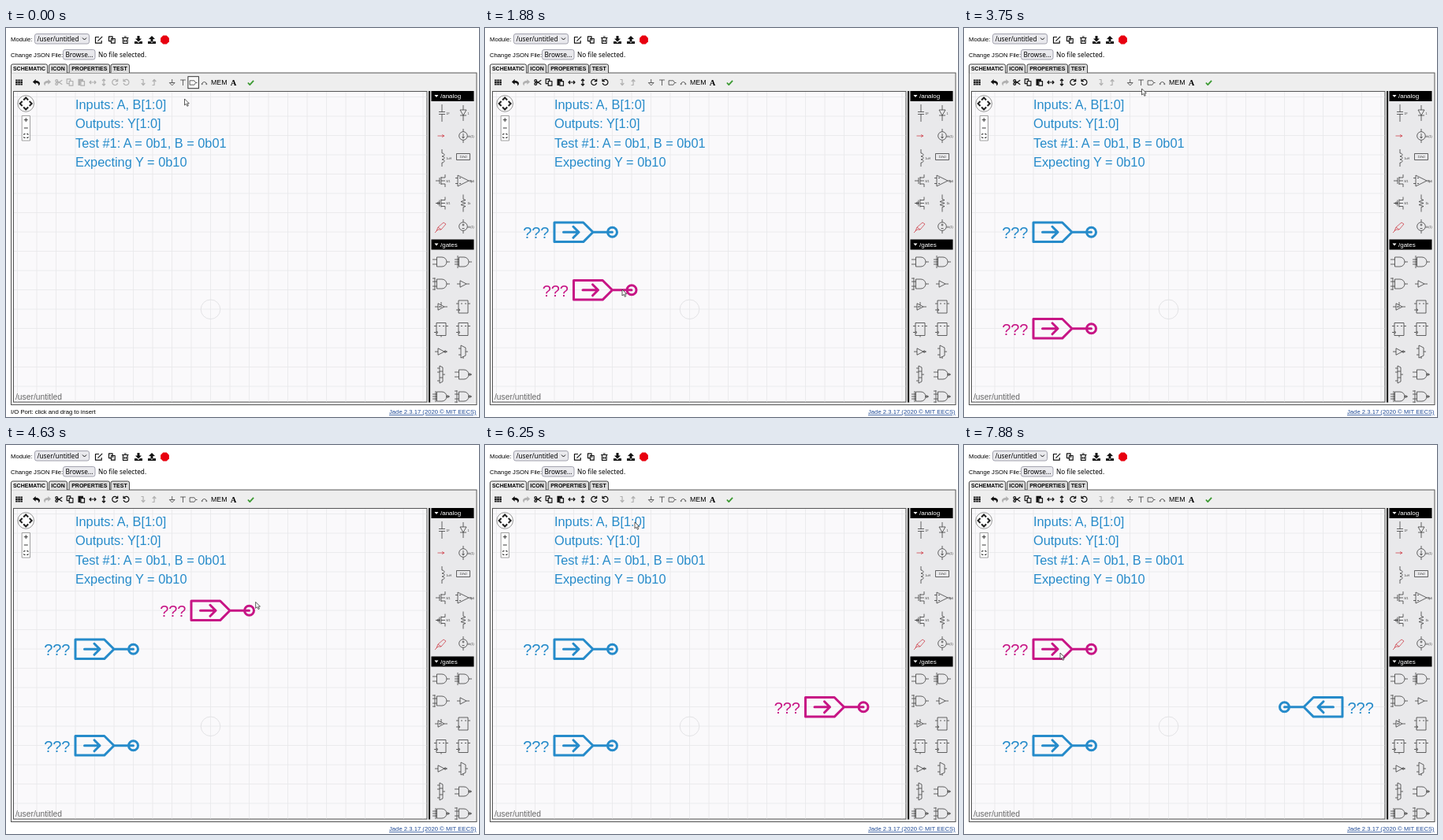
Recreate the animation shown at these times as an HTML page. Size 600 by 494 pixels, loop 8000 ms.

```html
<!DOCTYPE html>
<html lang="en">
<head>
<meta charset="utf-8">
<title>Schematic editor</title>
<style>
html, body { margin: 0; width: 100%; height: 100%; overflow: hidden; background: #fff; }
svg { display: block; width: 600px; height: 494px; font: 7.7px "Liberation Sans", Arial, sans-serif; }
.ui { font: 8.2px "Noto Sans", "Open Sans", sans-serif; }
.tab { font-weight: bold; font-size: 7px; }
.line { fill: none; stroke: #111; stroke-width: 1.2; stroke-linejoin: round; }
.thin { fill: none; stroke: #333; stroke-width: .75; }
.red { fill: none; stroke: #d0454f; stroke-width: .8; }
.fill { fill: #111; }
.off { opacity: .28; }
.note { font-size: 16.33px; fill: #268bca; }
.tiny { font-size: 3.6px; fill: #333; }
.port { fill: none; stroke-width: 3; stroke-linejoin: round; stroke-linecap: round; }
.label { font-size: 20px; }
</style>
</head>
<body>
<svg id="stage" viewBox="0 0 600 494">
  <text x="6" y="17">Module:</text>
  <rect x="36.5" y="7.5" width="69" height="12.5" rx="2.5" fill="#e9e9ed" stroke="#8f8f9d" stroke-width=".8"/>
  <text class="ui" x="39.5" y="16.7">/user/untitled</text>
  <path class="line" d="M97 12.5l2.5 2.5l2.5-2.5" style="stroke-width:1"/>
  <text x="6" y="36.6">Change JSON File:</text>
  <rect x="72.5" y="27.5" width="40.5" height="12.5" rx="2.5" fill="#e9e9ed" stroke="#8f8f9d" stroke-width=".8"/>
  <text class="ui" x="75.5" y="36.7">Browse...</text>
  <text class="ui" x="117" y="36.7">No file selected.</text>

  <rect x="6.5" y="57" width="590.5" height="421.5" fill="#eee" stroke="#555"/>
  <g id="tabs"></g>
  <rect x="9.5" y="80.5" width="524.5" height="394.5" fill="#faf9fb" stroke="#555"/>
  <path id="grid" fill="none" stroke="#e8e8ea" stroke-width=".8"/>
  <circle cx="259.5" cy="357.3" r="12.3" fill="none" stroke="#dedee0" stroke-width=".8"/>
  <g id="notes"></g>
  <text x="12" y="471.5" font-size="10.3" fill="#666">/user/untitled</text>

  <circle cx="25.2" cy="96" r="10.3" fill="#fff" stroke="#888" stroke-width=".9"/>
  <path fill="none" stroke="#222" stroke-width="2" d="M22.2 91.5l3-3l3 3M22.2 100.5l3 3l3-3M20.7 93l-3 3l3 3M29.7 93l3 3l-3 3"/>
  <path fill="#fff" stroke="#888" stroke-width=".8" d="M20.2 111.5h10.3v31.5h-10.3z"/>
  <path fill="none" stroke="#222" stroke-width=".9" d="M22.8 116.7h5M25.3 114.2v5M22.8 127h5M22.8 136v-1.5h1.7M26.3 134.5h1.7v1.5M28 138v1.5h-1.7M24.5 139.5h-1.7v-1.5"/>

  <rect x="536" y="80" width="2.2" height="395.5" fill="#222"/>
  <rect x="538.8" y="80" width="55.2" height="395.5" fill="#e9e9eb"/>
  <g id="headers"></g>
  <rect id="hover" y="61.7" width="13.5" height="15" fill="#fafafa" stroke="#222" stroke-width=".9"/>
  <g id="icons"></g>
  <g id="ports"></g>
  <text id="status" x="6" y="490"></text>
  <text x="486" y="490" fill="#1f4a96" text-decoration="underline">Jade 2.3.17 (2020 © MIT EECS)</text>
  <path id="arrow" fill="#fff" stroke="#333" stroke-width=".8" d="M0 0V8L2 6.3L3.4 9.3L4.8 8.6L3.4 5.8H5.8Z"/>
  <path id="hand" fill="#fff" stroke="#222" stroke-width=".8" d="M-.8 5V.6Q0-.6.8.6V3.8L4 4.6Q5 5 4.8 6.5L4 10H-.8L-3.4 6.4Q-3-5.6-.8 6.6Z"/>
</svg>
<script>
const $ = id => document.getElementById(id);
const LOOP = 8000, STEP = 125, GRID = 24.5, OX = 259.5, OY = 357;
const BLUE = '#268bca', PINK = '#c71585';

const icon = (x, y, d, cls = 'line', flip = '') =>
  `<path class="${cls}" transform="translate(${x} ${y}) ${flip}" d="${d}"/>`;
const text = (x, y, s, attrs = '') => `<text x="${x}" y="${y}" ${attrs}>${s}</text>`;
const ring = (x, y, r) => `M${x - r} ${y}a${r} ${r} 0 1 0 ${2 * r} 0a${r} ${r} 0 1 0 ${-2 * r} 0`;

// Tabs, notes, grid and part headers
$('tabs').innerHTML = [['SCHEMATIC', 6.5, 46], ['ICON', 54.5, 23], ['PROPERTIES', 80, 51.5], ['TEST', 133, 23.5]]
  .map(([name, x, w], i) =>
    `<path d="M${x} 57V48q0-2 2-2h${w - 4}q2 0 2 2v9" fill="${i ? '#ddd' : '#eee'}" stroke="#333" stroke-width=".9"/>` +
    text(x + w / 2, 54, name, 'class="tab" text-anchor="middle"')).join('') +
  '<path d="M7 57h45" stroke="#eee" stroke-width="1.4"/>';

$('notes').innerHTML = ['Inputs: A, B[1:0]', 'Outputs: Y[1:0]', 'Test #1: A = 0b1, B = 0b01', 'Expecting Y = 0b10']
  .map((s, i) => text(88, 102.7 + GRID * i, s, 'class="note"')).join('');

let lines = '';
for (let x = OX - 10 * GRID; x < 534; x += GRID) lines += `M${x} 81V474.5`;
for (let y = OY - 11 * GRID; y < 475; y += GRID) lines += `M10 ${y}H533.5`;
$('grid').setAttribute('d', lines);

$('headers').innerHTML = [['/analog', 80], ['/gates', 268.5]].map(([name, y]) =>
  `<rect x="539.5" y="${y}" width="54" height="13" fill="#000"/>` +
  `<path d="M543.5 ${y + 5}h5l-2.5 3z" fill="#fff"/>` +
  text(551, y + 9.4, name, 'fill="#fff" font-size="8"')).join('');

// File bar and toolbar
const COPY = 'M-1-1.5H3.7V4.2H-1ZM-1 1.6H-4V-4.2H.6V-1.5';
const UNDO = 'M-4.6-.6L-.8-4V-2C3-2 4.5 0 4.5 1.5C4.5 3 3.5 4 2.5 4.3C3.5 2 2 .7-.8.7V2.7Z';
const TURN = 'M2.8-2.2A3.5 3.5 0 1 0 3.4 1M3.5-4.3V-1.3H.5';
const LEVEL = 'M-3-3.5H-.4V3M-2.6 1L-.4 3.6L1.8 1';
const TRAY = 'M-5 2H-2L0 4L2 2H5V5H-5Z';
const MIRROR = 'scale(-1 1)', FLIP = 'scale(1 -1)';
let cells = '';
for (let i = 0; i < 9; i++) cells += `M${(i % 3) * 3.1 - 4.4} ${Math.floor(i / 3) * 2.6 - 3.6}h2.5v2h-2.5z`;

const fileBar = [
  icon(118, 15, 'M3.2 1V4.2H-4.5V-3.5H0M-1.6 1.6L4.2-4.2'), icon(134.5, 15, COPY + 'M1-1.5V1'),
  icon(151.3, 15, 'M-2.8-2.5V4.5H2.8V-2.5M-4.2-2.5H4.2M-1.4-4H1.4M-1 0V2.8M1 0V2.8'),
  icon(168, 15, 'M-1.5-5H1.5V-1.5H4L0 2.5L-4-1.5H-1.5Z' + TRAY, 'fill'),
  icon(185, 15, 'M0-5L4-1H1.5V2.5H-1.5V-1H-4Z' + TRAY, 'fill'),
  '<path transform="translate(201.5 15)" fill="#e8000f" d="M-2.2-5.4H2.2L5.4-2.2V2.2L2.2 5.4H-2.2L-5.4 2.2V-2.2Z"/>'
];
const editTools = [
  icon(67, 69, ring(-2.8, -2, 1.4) + ring(-2.8, 2, 1.4) + 'M-1.6-1.2L4.3 2.8M-1.6 1.2L4.3-2.8'),
  icon(81.2, 69, COPY),
  icon(95.5, 69, 'M-4-4.2H2.5V-2H-1V4H-4Z', 'fill'), icon(95.5, 69, 'M-.6-1.4H4V4.2H-.6Z'),
  icon(110, 69, 'M-4 0H4M-2-2L-4 0L-2 2M2-2L4 0L2 2'),
  icon(124, 69, 'M0-4V4M-2-2L0-4L2-2M-2 2L0 4L2 2'),
  icon(138.2, 69, TURN), icon(152.5, 69, TURN, 'line', MIRROR)
];
const toolbar = [
  icon(16.6, 69, cells, 'fill'), icon(38.5, 69, UNDO, 'fill'), icon(52.5, 69, UNDO, 'fill off', MIRROR),
  `<g id="edit">${editTools.join('')}</g>`,
  icon(174.5, 69, LEVEL, 'line off'), icon(188.5, 69, LEVEL, 'line off', FLIP),
  icon(210.7, 69, 'M0-4V.5M-3.4.5H3.4L0 4Z', 'thin'), icon(224.5, 69, 'M-3.4-3H3.4M0-3V4', 'thin'),
  icon(237.6, 69.5, 'M-4.5-2.7H1.3L3 0L1.3 2.7H-4.5ZM3 0H5', 'thin'),
  icon(251.5, 69.5, 'M-2.6 1A2.7 2.7 0 0 1 2.6 1' + ring(-2.8, 1.6, .6) + ring(2.8, 1.6, .6), 'thin'),
  text(260, 72.3, 'MEM', 'font-size="8.8"'),
  text(288.6, 72.9, 'A', 'text-anchor="middle" style="font:bold 10.5px \'Liberation Serif\',serif"'),
  icon(310.3, 69.5, 'M-3.4 0L-1 2.6L3.8-2.6', 'line" style="stroke:#3c9a32;stroke-width:1.8')
];

// Part bin
const AND = 'M-5.5-6H1A6 6 0 0 1 1 6H-5.5ZM7 0H11M-11-3H-5.5M-11 3H-5.5';
const NAND = AND + ring(8.3, 0, 1.3);
const TRI = 'M-4-4.2L4 0L-4 4.2ZM-8 0H-4M4 0H8';
const FLOP = 'M-6-8H6V8H-6ZM-9-4H-6M6-4H9M-9 4H-6M-6 2.5L-4 4L-6 5.5M-3-4H-1M2-4H4';
const SOURCE = ring(0, 0, 5.3) + 'M0-9V-5.3M0 5.3V9';
const FET = 'M-8 0H-3M-3-4V4M-1-5V5M-1-4H4V-8M-1 4H4V8M-1 0H4';
const MUX = 'M-3-8L3-5V5L-3 8ZM-6-4H-3M-6 4H-3M3 0H6M0 6V9';
const BARS = 'M-8-8V8M-11-7H-8M-11 7H-8';
const bin = [
  [553, 108, 'M0-11V-1.5M-4-1.5H4M-4 1.5H4M0 1.5V11', '1F'],
  [580, 108, 'M0-10V-4M-4-4H4L0 3ZM-4 3H4M0 3V10', '1'],
  [580, 137, SOURCE + 'M0-3V3M-1.5 1L0 3L1.5 1', 'dc(1)'],
  [553, 165, 'M0-11V-6C4-6 4-2 0-2C4-2 4 2 0 2C4 2 4 6 0 6V11', '1uH'],
  [580, 163.5, 'M-8.5-4H8.5V4H-8.5Z'], [553, 194, FET, '8/1'],
  [580, 194, 'M-7-7L7 0L-7 7ZM-10-3.5H-7M-10 3.5H-7M7 0H11M-5-3.5H-3M-5 3.5H-3', '1p6', 8],
  [553, 222.5, FET + ring(-4.5, 0, 1.4), '8/1'],
  [580, 222.5, 'M0-11V-5L3-4L-3-2L3 0L-3 2L3 4L0 5V11', '1k'],
  [580, 252, SOURCE + 'M-1.5-2H1.5M0-3.5V-.5M-1.5 2.5H1.5', 'dc(1)'],
  [552, 297, AND], [580, 297, AND + 'M-11 0H-5.5M-7-8V8'],
  [552, 325, AND + BARS], [580, 325, TRI], [552, 354, TRI + 'M0-6V-2M-2-1V1M-2 0H1'],
  [580, 354, FLOP], [552, 382.5, FLOP + 'M0 8V10'], [580, 382.5, FLOP],
  [552, 411, TRI + ring(5.2, 0, 1.2)], [580, 411, MUX],
  [552, 440, 'M-2-11L2-9V9L-2 11ZM-5-8H-2M-5-3H-2M-5 3H-5M-5 8H-2M2 0H5M-2-4H2M-2 4H2'],
  [580, 440, NAND], [552, 468, NAND + 'M-11 0H-5.5M-7-7V7'], [580, 468, NAND + BARS]
].map(([x, y, d, note, dx = 5.5]) =>
  icon(x, y, d, 'thin') + (note ? text(x + dx, y + 1.5, note, 'class="tiny"') : ''));
bin.push(
  text(580, 165, '1V/s0', 'class="tiny" text-anchor="middle"'),
  icon(552, 137, 'M-4.5 0H4M1-1.5L4 0L1 1.5', 'red'),
  icon(552, 252, 'M-6 6L-4 1L3-5L6-3L0 4L-4 4ZM-4 1L0 4M-8 8L-6 6', 'red')
);
$('icons').innerHTML = [...fileBar, ...toolbar, ...bin].join('');

// Pointer path: time, x, y of the tip
const PATH = [
  [0, 226.5, 90], [125, 215, 125], [250, 190, 195], [375, 170, 245], [500, 162, 258], [625, 162, 258],
  [875, 203, 152], [1000, 219, 105], [1250, 235, 72], [1500, 238, 70], [1625, 238, 70],
  [1750, 218, 165], [1875, 174, 332], [2000, 164, 368], [2250, 161, 380], [2625, 161, 380],
  [3125, 192, 250], [3500, 217, 115], [3750, 225.5, 77], [4000, 237, 70], [4250, 237, 70],
  [4375, 250, 108], [4750, 350, 245], [5250, 467, 322], [5500, 470, 321], [5625, 470, 321],
  [6250, 190, 98], [6500, 152, 71], [6875, 151, 70], [7250, 151, 70], [7500, 142, 130],
  [7750, 123, 255], [7875, 122, 264]
];
const pointer = t => {
  const i = PATH.findIndex(k => k[0] > t);
  if (i < 0) return PATH.at(-1).slice(1);
  const [t0, x0, y0] = PATH[i - 1], [t1, x1, y1] = PATH[i], p = (t - t0) / (t1 - t0);
  return [x0 + (x1 - x0) * p, y0 + (y1 - y0) * p];
};

const PORT_TOOL = { x: 237.6, tip: 'I/O Port: click and drag to insert' };
const CCW_TOOL = { x: 152.5, tip: 'Rotate Counterclockwise: rotate selection counterclockwise' };
const HOVERS = [[0, 125, PORT_TOOL], [1250, 1750, PORT_TOOL], [3875, 4375, PORT_TOOL], [6500, 7375, CCW_TOOL]];

const PORTS = [
  { from: 125, drop: 625, selected: t => t < 1750 || t >= 7875 },
  { from: 1750, drop: 2250, selected: t => t < 4375 },
  { from: 4375, drop: 5500, selected: t => t < 7875, turns: t => (t >= 6625) + (t >= 7000) }
];
$('ports').innerHTML = PORTS.map(() =>
  '<g><path class="port" d="M0 0H-24.5M-73.5-12.3H-36.8L-24.5 0L-36.8 12.3H-73.5ZM-62 0H-42.5M-49.5-7L-42.5 0L-49.5 7' +
  ring(0, 0, 6) + '"/><text class="label">???</text></g>').join('');

// Node shift after each quarter turn, and label placement: dx, dy, anchor
const SHIFT = [[0, 0], [-1, -1], [-3, 0]];
const LABEL = [[-80, 8, 'end'], [0, 98, 'middle'], [80, 8, 'start']];
const snap = (v, origin) => origin + Math.round((v - origin) / GRID) * GRID;

function drawPort(port, group, t) {
  group.style.display = t < port.from ? 'none' : '';
  if (t < port.from) return;
  const [px, py] = pointer(Math.min(t, port.drop));
  const turn = port.turns ? port.turns(t) : 0;
  const x = snap(px, OX) + SHIFT[turn][0] * GRID, y = snap(py, OY) + SHIFT[turn][1] * GRID + .3;
  const [dx, dy, anchor] = LABEL[turn], color = port.selected(t) ? PINK : BLUE;
  const [shape, label] = group.children;
  shape.setAttribute('transform', `translate(${x} ${y}) rotate(${-90 * turn})`);
  shape.setAttribute('stroke', color);
  label.setAttribute('x', x + dx);
  label.setAttribute('y', y + dy);
  label.setAttribute('text-anchor', anchor);
  label.setAttribute('fill', color);
}

function render() {
  const t = Math.floor((performance.now() % LOOP) / STEP) * STEP;
  const [x, y] = pointer(t);
  const hover = HOVERS.find(([a, b]) => t >= a && t < b)?.[2];
  const overTool = hover && y < 77;
  $('hover').style.display = hover ? '' : 'none';
  if (hover) $('hover').setAttribute('x', hover.x - 6.7);
  $('status').textContent = hover ? hover.tip : '';
  $('edit').setAttribute('class', t < 125 ? 'off' : '');
  PORTS.forEach((port, i) => drawPort(port, $('ports').children[i], t));
  $('arrow').style.display = overTool ? 'none' : '';
  $('hand').style.display = overTool ? '' : 'none';
  for (const id of ['arrow', 'hand']) $(id).setAttribute('transform', `translate(${x} ${y})`);
  requestAnimationFrame(render);
}
render();
</script>
</body>
</html>
```
